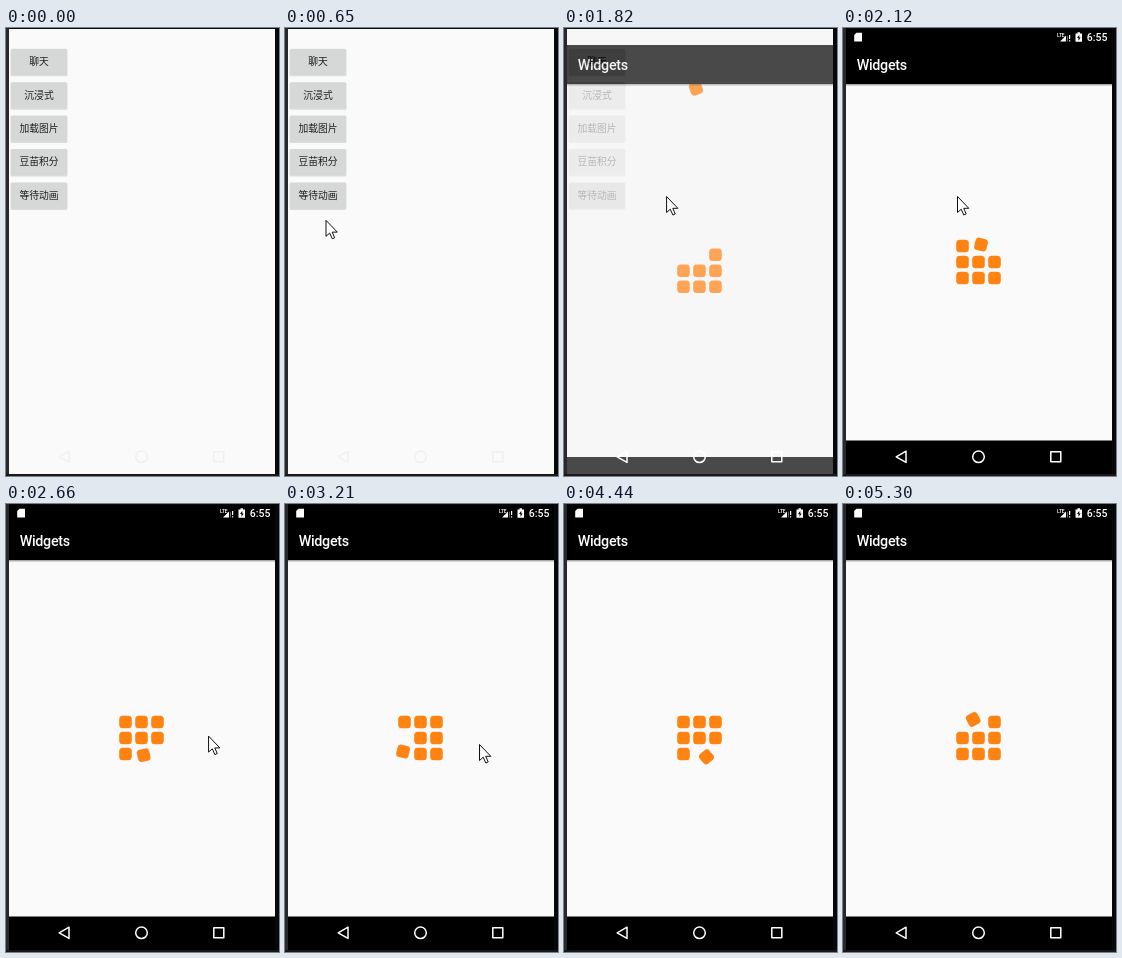
An HTML page for the animation above (5.37 s loop, 273 px wide and 448 px high).

```html
<!DOCTYPE html>
<html lang="zh-CN">
<head>
<meta charset="utf-8">
<style>
  html, body { margin: 0; width: 100%; height: 100%; overflow: hidden; background: #000; }
  svg { display: block; width: 273px; height: 448px; }
  text { font-family: Roboto, sans-serif; font-weight: 500; }
  .label { font: 400 9.8px "Noto Sans CJK SC", "Noto Sans CJK", sans-serif; text-anchor: middle; fill: #1e1e1e; }
  .title { font-size: 14.3px; letter-spacing: -.3px; }
</style>
</head>
<body>
<svg viewBox="0 0 273 448" xmlns="http://www.w3.org/2000/svg">
  <defs>
    <clipPath id="screenClip"><rect x="3" y="1" width="266" height="445"/></clipPath>
    <clipPath id="contentClip"><rect x="3" y="56" width="266" height="390"/></clipPath>
    <linearGradient id="barShadow" x2="0" y2="1">
      <stop stop-color="#000" stop-opacity=".4"/>
      <stop offset="1" stop-color="#000" stop-opacity="0"/>
    </linearGradient>
  </defs>
  <rect width="273" height="448" fill="#080808"/>
  <rect width="3" height="448" fill="#292929"/>
  <rect y="446" width="273" height="2" fill="#181818"/>
  <g clip-path="url(#screenClip)">
    <rect width="273" height="448" fill="#fafafa"/>
    <g id="buttons"></g>
    <g id="page">
      <rect id="pageBg" width="273" height="448"/>
      <g clip-path="url(#contentClip)"><g id="blocks" fill="#ff8312"></g></g>
      <rect id="statusBar" width="273" height="18"/>
      <rect y="17" width="273" height="39"/>
      <rect y="56" width="273" height="2.5" fill="url(#barShadow)"/>
      <rect id="navBar" width="273" height="40"/>
      <text class="title" x="13.7" y="42.3" fill="#fff">Widgets</text>
    </g>
    <g id="status" fill="#fff">
      <path d="M13.500 4.700H19V13.500H11.200V7Z"/>
      <text x="214" y="8.500" font-size="5" font-weight="700" letter-spacing="-.3">LTE</text>
      <path d="M217 13.500 223 7.500V13.500Z"/>
      <path d="M224 13.500V8.500L225 7V13.500Z" opacity=".4"/>
      <path d="M226 7H227.200V11H226ZM226 12.200H227.200V13.500H226Z"/>
      <path d="M232.500 5.500H234.500V4.200H237V5.500H239V13.800H232.500Z"/>
      <path d="M236.300 6.800 234 10H235.500V12.800L237.700 9.400H236.300Z" fill="#000"/>
      <text x="243.700" y="12.900" font-size="10.500">6:55</text>
    </g>
    <g id="nav" fill="none" stroke-width="1.5" stroke-linejoin="round">
      <path d="M53.200 428.800 63 423.200V434.400Z"/>
      <circle cx="135.500" cy="428.800" r="5.800"/>
      <rect x="207.800" y="423.800" width="10" height="10"/>
    </g>
  </g>
  <path id="cursor" d="M0 0V16L3.700 12.700 6.300 18.500 8.700 17.400 6.200 11.800H11.300Z"
        fill="#fff" stroke="#111" stroke-width="1"/>
</svg>
<script>
const LOOP = 5370;
const FRAME = 77, FIRST_FRAME = 262;
const PRESS = 1340, LAUNCH = 1720, SETTLED = 1870;
const STEP = 215.5, STEPS_START = 1735;   // one block move
const PITCH = 16, CENTER_X = 135.5;

const $ = id => document.getElementById(id);
const set = (el, attrs) => { for (const k in attrs) el.setAttribute(k, attrs[k]); };
const add = (parent, tag, attrs, text = '') => {
  const el = document.createElementNS('http://www.w3.org/2000/svg', tag);
  set(el, attrs);
  el.textContent = text;
  return parent.appendChild(el);
};
const clamp = v => Math.min(1, Math.max(0, v));
const mix = (a, b, u) => a + (b - a) * u;
const show = (id, on) => set($(id), { visibility: on ? 'visible' : 'hidden' });

// Stops of the pointer; it moves straight between them.
const pointerPath = [
  { t: 262, x: 133, y: 361 },
  { t: 724, x: 22, y: 158 },
  { t: 930, x: 22, y: 158 },
  { t: 1030, x: 31, y: 165 },
  { t: PRESS, x: 31, y: 165 },
  { t: 1570, x: 83, y: 175 },
  { t: 1800, x: 102, y: 168 },
  { t: 2110, x: 114, y: 168 },
  { t: 2500, x: 219, y: 214 },
  { t: 2720, x: 194, y: 240 },
  { t: 3290, x: 194, y: 240 },
  { t: 3640, x: 250, y: 450 }
];

const buttons = ['聊天', '沉浸式', '加载图片', '豆苗积分', '等待动画'].map((label, i) => {
  const y = 20.8 + i * 33.4;
  add($('buttons'), 'rect', { x: 4.5, y: y + .5, width: 57, height: 27, rx: 1.5, opacity: .12 });
  const face = add($('buttons'), 'rect', { x: 5, y, width: 56, height: 26, rx: 1.2, fill: '#d6d7d7' });
  add($('buttons'), 'text', { class: 'label', x: 33, y: y + 16.4 }, label);
  return face;
});

const addBlock = () => add($('blocks'), 'rect', { x: -6.3, y: -6.3, width: 12.6, height: 12.6, rx: 3.5 });
const place = (block, x, y, angle = 0) =>
  set(block, { transform: `translate(${x} ${y}) rotate(${angle})` });
const centerBlock = addBlock();
const ring = Array.from({ length: 8 }, addBlock);

// Ring cells run clockwise from the top left.
function cell(i) {
  const a = (i - 3) * Math.PI / 4;
  return { x: PITCH * Math.round(1.2 * Math.cos(a)), y: PITCH * Math.round(1.2 * Math.sin(a)) };
}

// Each step, the block after the hole rolls into it and bulges outwards.
function drawBlocks(t, settled) {
  const phase = Math.max(0, (t - STEPS_START) / STEP);
  const hole = Math.floor(phase) % 8, mover = (hole + 1) % 8;
  const p = (1 - Math.cos(Math.PI * (phase % 1))) / 2;
  const midY = settled ? 234 : 242.7;
  place(centerBlock, CENTER_X, midY);
  ring.forEach((block, i) => {
    const { x, y } = cell(i);
    place(block, CENTER_X + x, midY + y);
    set(block, { visibility: i === hole ? 'hidden' : 'visible' });
  });
  const from = cell(mover), to = cell(hole);
  const bulge = 3 * Math.sin(Math.PI * p);
  const outX = from.x === to.x ? Math.sign(to.x) * bulge : 0;
  const outY = from.y === to.y ? Math.sign(to.y) * bulge : 0;
  // The first layout pass still has the moving block near the page top.
  const y = settled ? midY + mix(from.y, to.y, p) + outY : 60.5;
  place(ring[mover], CENTER_X + mix(from.x, to.x, p) + outX, y, -90 * p);
}

function drawPointer(t) {
  const i = pointerPath.findIndex(stop => stop.t > t);
  show('cursor', i > 0);
  if (i < 1) return;
  const a = pointerPath[i - 1], b = pointerPath[i], u = (t - a.t) / (b.t - a.t);
  set($('cursor'), { transform: `translate(${mix(a.x, b.x, u) + .5} ${mix(a.y, b.y, u) + .5})` });
}

function render(time) {
  const t = FIRST_FRAME + FRAME * Math.floor((time - FIRST_FRAME) / FRAME);
  const settled = t >= SETTLED;
  set(buttons[4], { fill: t >= PRESS ? '#c8c8c8' : '#d6d7d7' });
  set($('page'), { opacity: clamp((t - 1695) / 152) });
  set($('pageBg'), { fill: settled ? '#fafafa' : '#f6f6f6' });
  set($('navBar'), { y: settled ? 412.5 : 429 });
  set($('nav'), { stroke: t >= LAUNCH ? '#fff' : '#f0f0f0' });
  show('statusBar', settled);
  show('status', settled);
  drawBlocks(t, settled);
  drawPointer(t);
}

const start = performance.now();
function loop() {
  render((performance.now() - start) % LOOP);
  requestAnimationFrame(loop);
}
loop();
</script>
</body>
</html>
```
